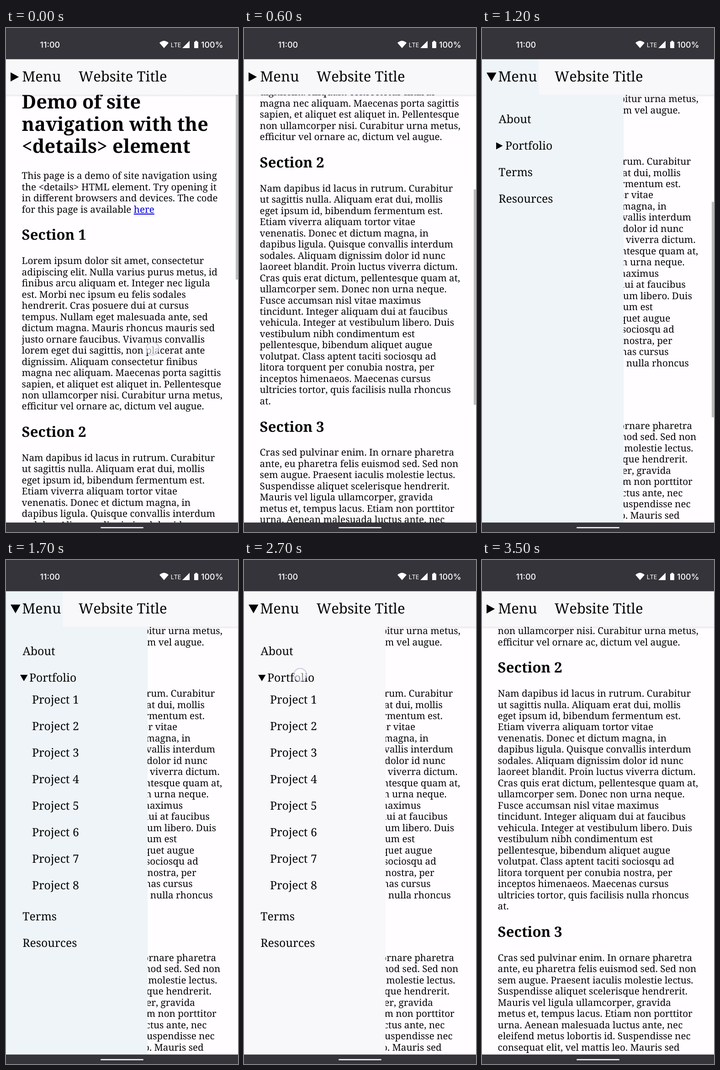
Animation of 508x1102 px, one loop 7.6 s. Source, as an HTML page:

```html
<!DOCTYPE html>
<html lang="en">
<head>
<meta charset="utf-8">
<title>Site navigation demo</title>
<style>
html, body { margin: 0; width: 100%; height: 100%; overflow: hidden; background: #fffdff; }
svg { display: block; width: 100%; height: 100%; }
text {
  font-family: "Noto Serif", serif; font-kerning: none; fill: #050506;
  text-rendering: geometricPrecision; white-space: pre;
}
.status text { font-family: Inter, sans-serif; font-weight: 500; fill: #fff; }
.status .net { font-family: "Noto Sans", sans-serif; font-weight: 400; }
.link { fill: #0000e0; text-decoration: underline; }
</style>
</head>
<body>
<svg viewBox="0 0 508 1102" preserveAspectRatio="none">
  <defs>
    <linearGradient id="shade" x1="0" y1="0" x2="0" y2="1">
      <stop offset="0" stop-color="#000" stop-opacity=".09"/>
      <stop offset="1" stop-color="#000" stop-opacity="0"/>
    </linearGradient>
  </defs>
  <rect width="508" height="1102" fill="#fffdff"/>
  <g id="page"></g>
  <rect id="bar" x="503" width="5" height="471" fill="#bcbbbe"/>
  <rect y="146" width="508" height="5" fill="url(#shade)"/>
  <rect y="68" width="508" height="78" fill="#f8f7fa"/>
  <rect id="button" y="68" width="124" height="78"/>
  <rect id="panel" y="146" width="310" height="936"/>
  <path id="menuMark"/>
  <g id="header"></g>
  <g id="menu">
    <path id="subMark"/>
    <g id="top"></g>
    <g id="projects"></g>
    <g id="rest"></g>
  </g>
  <circle id="touch" r="14" fill="#fff" fill-opacity=".58" stroke="#b9bcda" stroke-opacity=".75" stroke-width="2"/>
  <g class="status">
    <rect width="508" height="68.3" fill="#35343a"/>
    <text x="74.5" y="43" font-size="18">11:00</text>
    <path d="M336 32.5Q346 23.5 356 32.5L346 44Z" fill="#fff"/>
    <text class="net" x="360.5" y="41.5" font-size="14">LTE</text>
    <path d="M386 44H402V28Z" fill="#fff"/>
    <path d="M414.5 28h4v2h1.5q1 0 1 1v12q0 1-1 1h-7q-1 0-1-1v-12q0-1 1-1h1.500z" fill="#fff"/>
    <text x="427" y="43" font-size="18">100%</text>
  </g>
  <rect y="1081.3" width="508" height="20.7" fill="#35343a"/>
  <rect x="207" y="1091.2" width="94" height="2.6" rx="1.3" fill="#fff"/>
</svg>
<script>
const LOOP = 7600, STEP = 100, SCROLL = 647.8;
const EM = 20.7, LINE = 24.49, LEFT = 34.6, MENU_LEFT = 36.2;
const $ = id => document.getElementById(id);

function addText(parent, str, x, y, size, bold) {
  const el = document.createElementNS("http://www.w3.org/2000/svg", "text");
  el.setAttribute("x", x);
  el.setAttribute("y", y);
  el.setAttribute("font-size", size);
  if (bold) el.setAttribute("font-weight", 700);
  el.textContent = str;
  $(parent).append(el);
  return el;
}

const intro = `This page is a demo of site navigation using
the <details> HTML element. Try opening it
in different browsers and devices. The code
for this page is available `;

const sections = [
`Lorem ipsum dolor sit amet, consectetur
adipiscing elit. Nulla varius purus metus, id
finibus arcu aliquam et. Integer nec ligula
est. Morbi nec ipsum eu felis sodales
hendrerit. Cras posuere dui at cursus
tempus. Nullam eget malesuada ante, sed
dictum magna. Mauris rhoncus mauris sed
justo ornare faucibus. Vivamus convallis
lorem eget dui sagittis, non placerat ante
dignissim. Aliquam consectetur finibus
magna nec aliquam. Maecenas porta sagittis
sapien, et aliquet est aliquet in. Pellentesque
non ullamcorper nisi. Curabitur urna metus,
efficitur vel ornare ac, dictum vel augue.`,
`Nam dapibus id lacus in rutrum. Curabitur
ut sagittis nulla. Aliquam erat dui, mollis
eget ipsum id, bibendum fermentum est.
Etiam viverra aliquam tortor vitae
venenatis. Donec et dictum magna, in
dapibus ligula. Quisque convallis interdum
sodales. Aliquam dignissim dolor id nunc
laoreet blandit. Proin luctus viverra dictum.
Cras quis erat dictum, pellentesque quam at,
ullamcorper sem. Donec non urna neque.
Fusce accumsan nisl vitae maximus
tincidunt. Integer aliquam dui at faucibus
vehicula. Integer at vestibulum libero. Duis
vestibulum nibh condimentum est
pellentesque, bibendum aliquet augue
volutpat. Class aptent taciti sociosqu ad
litora torquent per conubia nostra, per
inceptos himenaeos. Maecenas cursus
ultricies tortor, quis facilisis nulla rhoncus
at.`,
`Cras sed pulvinar enim. In ornare pharetra
ante, eu pharetra felis euismod sed. Sed non
sem augue. Praesent iaculis molestie lectus.
Suspendisse aliquet scelerisque hendrerit.
Mauris vel ligula ullamcorper, gravida
metus et, tempus lacus. Etiam non porttitor
urna. Aenean malesuada luctus ante, nec
eleifend metus lobortis id. Suspendisse nec
consequat elit, vel mattis leo. Mauris sed`];

// Sets the lines of a paragraph; returns its last line and baseline.
function addParagraph(str, y) {
  let last;
  str.split("\n").forEach((line, i) => {
    if (i) y += LINE;
    last = addText("page", line, LEFT, y, EM);
  });
  return { last, y };
}

function buildPage() {
  ["Demo of site", "navigation with the", "<details> element"].forEach((line, i) =>
    addText("page", line, LEFT, 176.3 + i * 48.51, EM * 2, true));
  let { last, y } = addParagraph(intro, 330.3);
  const link = document.createElementNS("http://www.w3.org/2000/svg", "tspan");
  link.setAttribute("class", "link");
  link.textContent = "here";
  last.append(link);
  sections.forEach((body, i) => {
    addText("page", "Section " + (i + 1), LEFT, y + 59.71, EM * 1.5, true);
    y = addParagraph(body, y + 112.35).y;
  });
}

function buildMenu() {
  const size = EM * 1.2;
  addText("header", "Menu", 35.2, 117.3, EM * 1.5);
  addText("header", "Website Title", 158.7, 117.3, EM * 1.5);
  addText("top", "About", MENU_LEFT, 208.2, size);
  addText("top", "Portfolio", 51, 266.2, size);
  for (let i = 0; i < 8; i++) addText("projects", "Project " + (i + 1), MENU_LEFT + EM, 313.9 + i * 57.95, size);
  addText("rest", "Terms", MENU_LEFT, 324.2, size);
  addText("rest", "Resources", MENU_LEFT, 382.2, size);
}

// Time windows in ms; each glow ends with its strength, each tap with its place.
const within = (t, [from, to]) => t >= from && t < to;
const menuOpen = [1100, 3400], subOpen = [1700, 2900];
const glows = [
  [1000, 1300, 1], [1300, 1400, .5],
  [1600, 1800, 1], [1800, 1900, .5],
  [2800, 3000, 1], [3300, 3500, 1]
];
const taps = [
  [900, 1100, 70, 104], [1500, 1700, 123, 251],
  [2700, 2900, 123, 251], [3200, 3400, 70, 104]
];

function scrollAt(t) {
  const u = Math.min(1, t / 800) ** 0.713;
  return SCROLL * u * u * (3 - 2 * u);
}

function mix(k) {
  const from = [248, 247, 250], to = [238, 244, 248];
  return `rgb(${from.map((c, i) => Math.round(c + (to[i] - c) * k))})`;
}

function show(id, on) { $(id).style.display = on ? "" : "none"; }

function render(ms) {
  const t = Math.floor(ms / STEP) * STEP;
  const scroll = scrollAt(t);
  const open = within(t, menuOpen), sub = within(t, subOpen);
  const glow = glows.find(g => within(t, g));
  const tint = mix(glow ? glow[2] : 0);

  $("page").setAttribute("transform", `translate(0 ${-scroll})`);
  $("bar").setAttribute("y", 79 + scroll * 0.465);
  $("bar").setAttribute("opacity", t < 1300 ? 1 : t < 1400 ? .5 : 0);

  $("button").setAttribute("fill", tint);
  $("panel").setAttribute("fill", tint);
  show("panel", open);
  show("menu", open);
  show("projects", sub);
  $("rest").setAttribute("transform", `translate(0 ${sub ? 463.7 : 0})`);
  $("menuMark").setAttribute("d", open ? "M10 97.500H31.500L20.800 116.500Z" : "M10 97L28.200 107L10 117Z");
  $("subMark").setAttribute("d", sub ? "M31 251H47.500L39.200 265Z" : "M31 250L45.500 257.500L31 265.500Z");

  const tap = t < 300 ? [0, 300, 321, 701 - scroll] : taps.find(p => within(t, p));
  show("touch", tap);
  if (tap) {
    $("touch").setAttribute("cx", tap[2]);
    $("touch").setAttribute("cy", tap[3]);
  }
}

buildPage();
buildMenu();
const start = performance.now();
function tick() {
  render((performance.now() - start) % LOOP);
  requestAnimationFrame(tick);
}
render(0);
requestAnimationFrame(tick);
</script>
</body>
</html>
```
